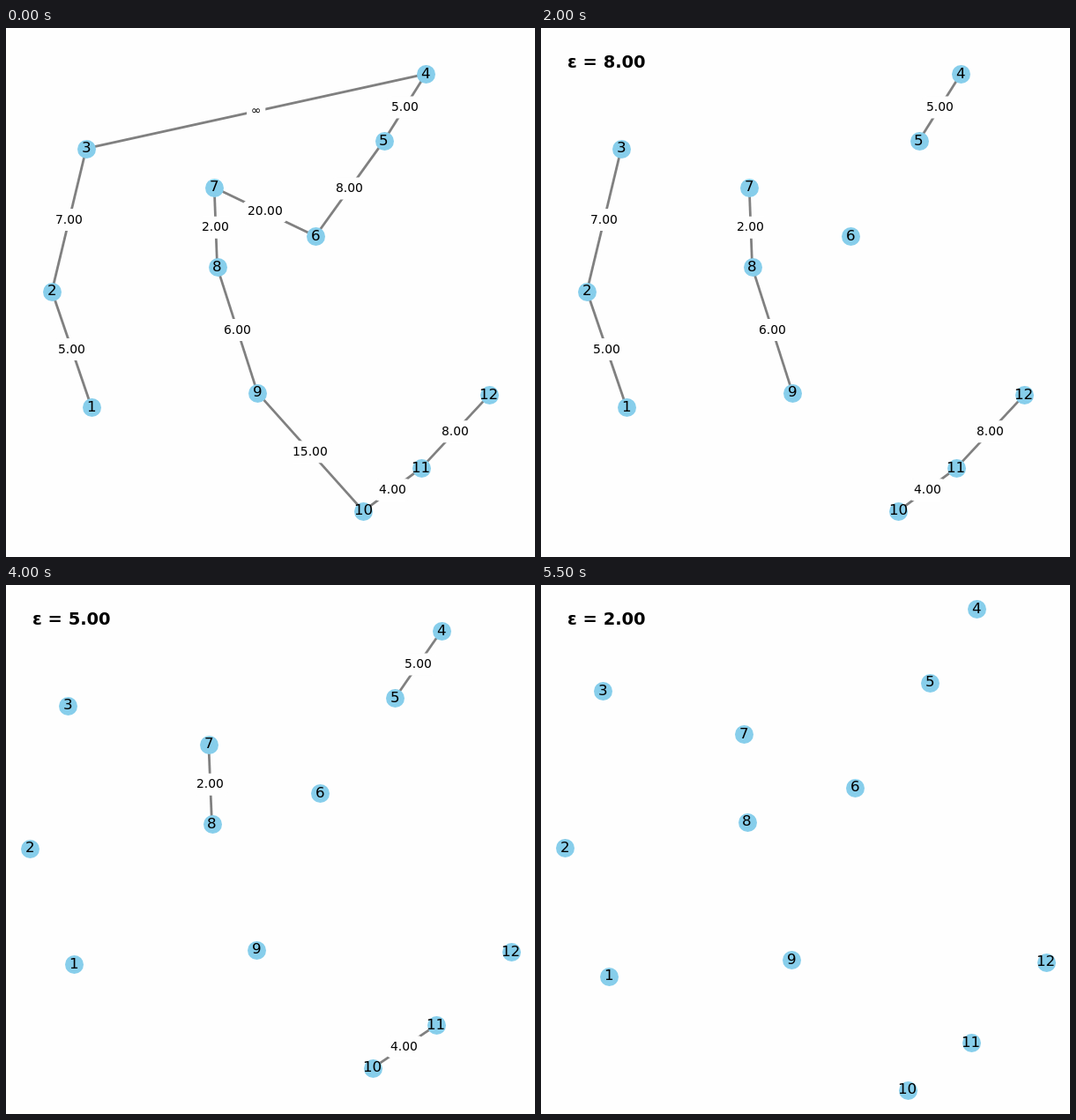
These frames come from a looping animation (600 by 600 pixels, 8.5 s). An HTML page with a canvas:

```html
<!DOCTYPE html>
<html lang="en">
<head>
<meta charset="utf-8">
<title>Threshold graph</title>
<style>
  html, body { margin: 0; width: 100%; height: 100%; overflow: hidden; background: #fefefe; }
  canvas { display: block; width: 600px; height: 600px; }
</style>
</head>
<body>
<canvas id="stage" width="600" height="600"></canvas>
<script>
const ctx = document.getElementById('stage').getContext('2d');
const FAMILY = '"DejaVu Sans", sans-serif';
const PAPER = '#fefefe';
const SIZE = 600, PT = 100 / 72, MARGIN = 0.05;
const LOOP = 8500, STEP = 500;

// A path of twelve nodes in unit coordinates, y down
const POINTS = [
  [0.0909, 0.7631], [0, 0.4971], [0.0786, 0.1706], [0.8554, 0],
  [0.7592, 0.1533], [0.6027, 0.371], [0.3714, 0.2599], [0.3782, 0.4424],
  [0.4704, 0.7295], [0.7123, 1], [0.8443, 0.902], [1, 0.7346]
];

// Weight of each link from node i to node i + 1; the heaviest is cut first
const EDGES = [5, 7, Infinity, 5, 8, 20, 2, 6, 15, 4, 8]
  .map((weight, i) => ({ weight, i }))
  .sort((a, b) => a.weight === b.weight ? 0 : b.weight - a.weight);

const format = w => w === Infinity ? '∞' : w.toFixed(2);

// Scale one axis to hold all nodes plus a margin around the linked ones
function axis(k, edges) {
  const linked = edges.flatMap(({ i }) => [POINTS[i][k], POINTS[i + 1][k]]);
  let lo = 0, hi = 1;
  if (linked.length) {
    const a = Math.min(...linked), b = Math.max(...linked);
    const pad = MARGIN * (b - a);
    lo = Math.min(lo, a - pad);
    hi = Math.max(hi, b + pad);
  }
  const pad = MARGIN * (hi - lo);
  return v => SIZE * (v - lo + pad) / (hi - lo + 2 * pad);
}

function setFont(points, weight = 'normal') {
  ctx.font = `${weight} ${points * PT}px ${FAMILY}`;
}

function centerText(text, x, y, drop) {
  const w = ctx.measureText(text).width;
  ctx.fillText(text, Math.round(x - w / 2), Math.round(y + drop));
}

function drawLink({ a, b }) {
  ctx.beginPath();
  ctx.moveTo(a.x, a.y);
  ctx.lineTo(b.x, b.y);
  ctx.stroke();
}

function drawWeight({ a, b, text }) {
  const x = (a.x + b.x) / 2, y = (a.y + b.y) / 2;
  const w = ctx.measureText(text).width + 7 * PT, h = 18 * PT;
  ctx.fillStyle = PAPER;
  ctx.beginPath();
  ctx.roundRect(x - w / 2, y - h / 2, w, h, 3.5 * PT);
  ctx.fill();
  ctx.fillStyle = '#000';
  centerText(text, x, y, 4);
}

// Discs sit on pixel centres
function drawNode({ x, y }) {
  ctx.beginPath();
  ctx.arc(Math.round(x) + 0.5, Math.round(y) + 0.5, 10.5, 0, Math.PI * 2);
  ctx.fill();
}

function draw(step) {
  const edges = EDGES.slice(step);
  const toX = axis(0, edges), toY = axis(1, edges);
  const nodes = POINTS.map(([u, v]) => ({ x: toX(u), y: toY(v) }));
  const links = edges.map(({ weight, i }) => ({ a: nodes[i], b: nodes[i + 1], text: format(weight) }));

  ctx.fillStyle = PAPER;
  ctx.fillRect(0, 0, SIZE, SIZE);

  ctx.strokeStyle = '#808080';
  ctx.lineWidth = 2 * PT;
  links.forEach(drawLink);

  setFont(10);
  links.forEach(drawWeight);

  ctx.fillStyle = '#87ceeb';
  nodes.forEach(drawNode);

  ctx.fillStyle = '#000';
  setFont(12);
  nodes.forEach(({ x, y }, i) => centerText(String(i + 1), x, y, 4.5));

  if (step > 0) {
    setFont(14, 'bold');
    ctx.fillText('ε = ' + format(EDGES[step - 1].weight), 30, 45);
  }
}

const start = performance.now();
function tick() {
  const t = (performance.now() - start) % LOOP;
  draw(Math.min(EDGES.length, Math.floor(t / STEP)));
  requestAnimationFrame(tick);
}
tick();
</script>
</body>
</html>
```
